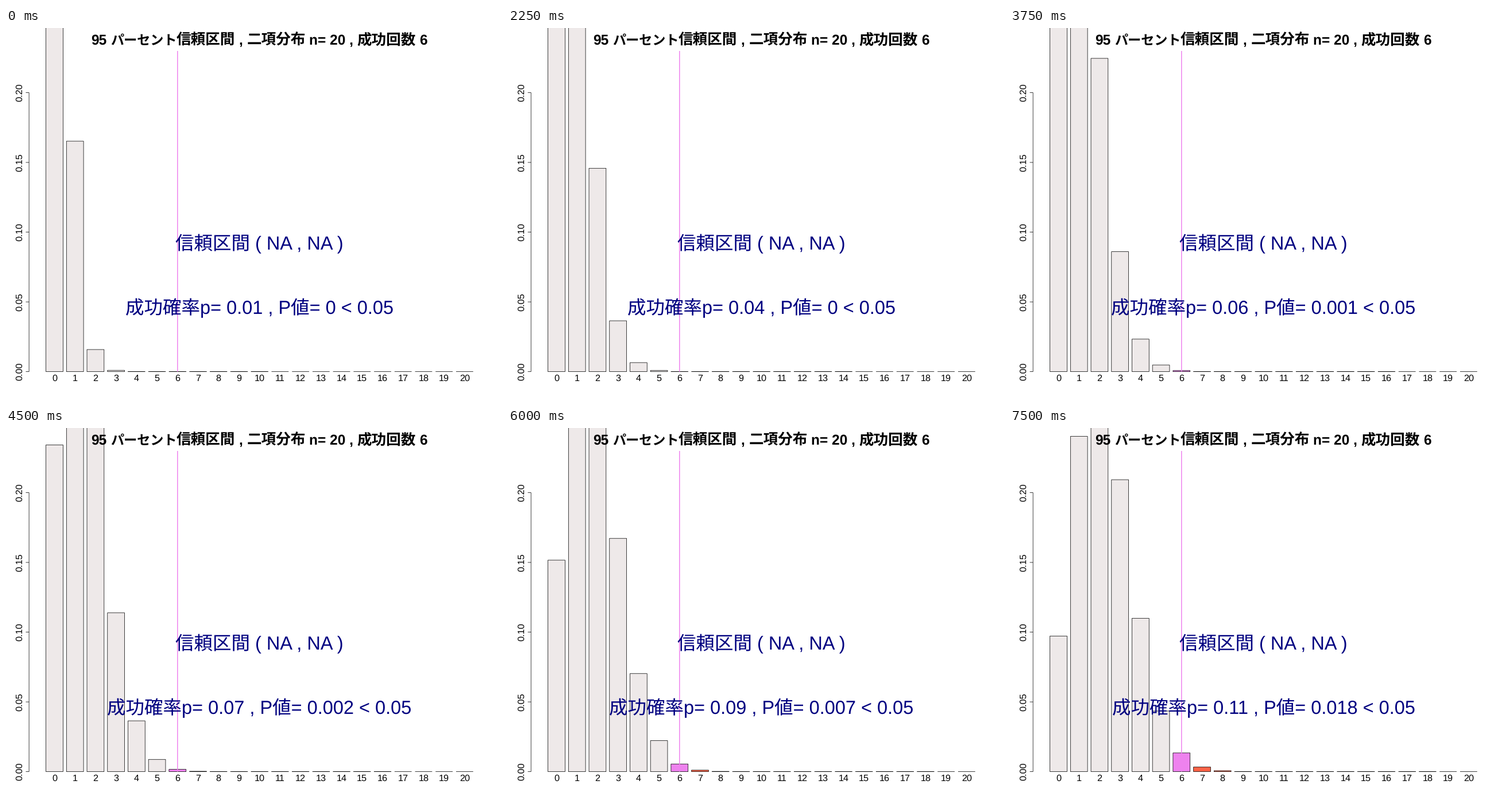
Recreate the animation shown at these times as a matplotlib script. Size 864x648 px, loop 8000 ms.

```python
import math

import matplotlib.pyplot as plt
from matplotlib.animation import FuncAnimation
from matplotlib.patches import Rectangle

W, H = 864, 648
N, HITS = 20, 6
BASE, SCALE = 598.6, 2430      # y of zero, pixels per unit of probability
LEFT, STEP, BAR = 69.6, 35.72, 29.77
THIN = 0.75
NAVY, VIOLET = "#000080", "#ee82ee"
TICK_MS, STEP_TICKS, TICKS = 250, 3, 32

plt.rcParams["font.family"] = ["Liberation Sans", "Noto Sans CJK JP"]
plt.rcParams["text.hinting"] = "none"

fig = plt.figure(figsize=(W / 72, H / 72), dpi=72, facecolor="white")
ax = fig.add_axes([0, 0, 1, 1])
ax.set_xlim(0, W)
ax.set_ylim(H, 0)
ax.axis("off")


def label(x, y, text, size, **style):
    style = {"ha": "center", "va": "baseline", "zorder": 5, **style}
    return ax.text(x, y, text, fontsize=size, **style)


def line(xs, ys, color="black", width=THIN, z=2):
    ax.plot(xs, ys, color=color, lw=width, zorder=z,
            solid_capstyle="butt", snap=False)


def binom(k, p):
    return math.comb(N, k) * p**k * (1 - p) ** (N - k)


def number(x):
    return f"{round(x, 3):g}"


def bar_color(k):
    if k < HITS:
        return "#eee9e9"
    return VIOLET if k == HITS else "#ff6347"


# Title: Latin, kana and kanji runs have different set widths
for x, text, size in [
    (148, "95", 24.5), (182, "パーセント", 23.1), (297, "信頼区間", 25.6),
    (405, ",", 24.5), (419.5, "二項分布", 25.6), (528, "n= 20 ,", 24.5),
    (611.5, "成功回数", 25.6), (720.5, "6", 24.5),
]:
    label(x, 29, text, size, weight="bold", ha="left")

# Vertical axis
line([40.1, 40.1], [BASE - 0.2 * SCALE, BASE])
for i in range(5):
    v = 0.05 * i
    y = BASE - v * SCALE
    line([34.5, 40.1], [y, y])
    label(28.5, y, f"{v:.2f}", 16.2, rotation=90, rotation_mode="anchor")

# Bars
bars = []
for k in range(N + 1):
    x = LEFT + k * STEP
    bar = Rectangle((x, BASE), BAR, 0, fc=bar_color(k), ec="black",
                    lw=THIN, zorder=1, snap=False)
    bars.append(ax.add_patch(bar))
    label(x + BAR / 2, 615, str(k), 16.2)

mark = LEFT + HITS * STEP + BAR / 2
line([mark, mark], [40, BASE], VIOLET, 2 * THIN, 3)

label(441.5, 386, "信頼区間 ( NA , NA )", 32.5, color=NAVY)
result = label(441.5, 498, "", 32.5, color=NAVY)


def draw(i):
    p = (i // STEP_TICKS + 1) / 100
    probs = [binom(k, p) for k in range(N + 1)]
    for bar, q in zip(bars, probs):
        bar.set_height(-q * SCALE)
    tail = sum(probs[HITS:])
    result.set_text(f"成功確率p= {number(p)} , P値= {number(tail)} < 0.05")
    return bars + [result]


anim = FuncAnimation(fig, draw, frames=TICKS, interval=TICK_MS,
                     repeat=True, repeat_delay=0)
plt.show()
```
